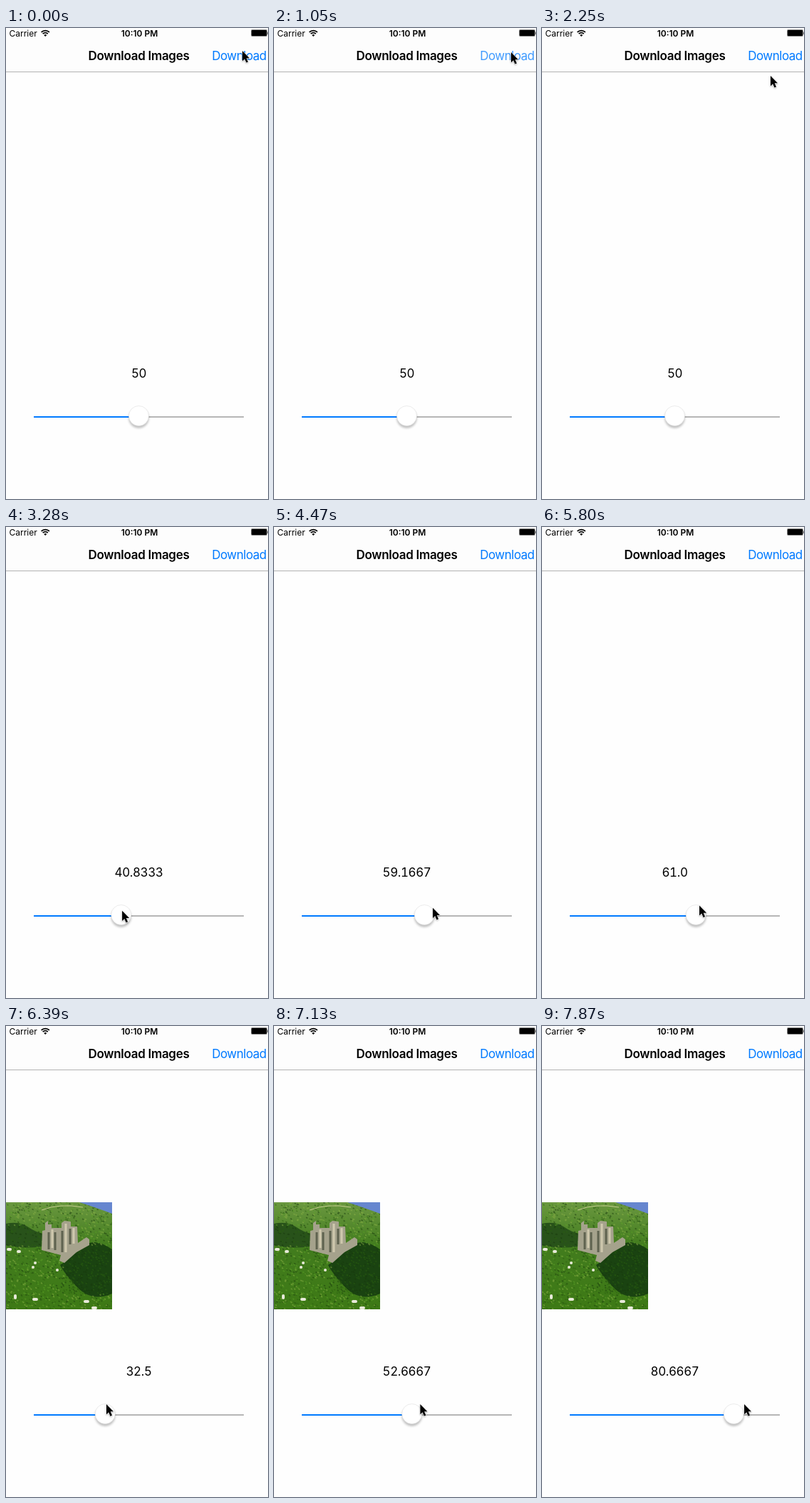
An HTML page for the animation above (8 s loop, 368 px wide and 660 px high).

```html
<!DOCTYPE html>
<html lang="en">
<head>
<meta charset="utf-8">
<title>Download Images</title>
<style>
  html, body { margin: 0; width: 100%; height: 100%; overflow: hidden; background: #fefefe; }
  svg { display: block; }
  text { font: 17px Inter, "Liberation Sans", sans-serif; letter-spacing: -.4px; }
  .title { font-weight: 600; letter-spacing: -.3px; }
  .status { font-size: 12px; letter-spacing: 0; }
  .clock { font-weight: 600; }
  #button { letter-spacing: -.5px; }
  #label { font-variant-numeric: tabular-nums; }
  #knob { filter: drop-shadow(0 3px 1.5px rgba(0, 0, 0, .24)); }
  #cursor { paint-order: stroke; filter: drop-shadow(0 1px 1px rgba(0, 0, 0, .3)); }
</style>
</head>
<body>
<svg width="368" height="660" viewBox="0 0 368 660">
  <defs>
    <linearGradient id="grass" x1="0" y1="0" x2="0" y2="1">
      <stop offset="0" stop-color="#6b9840"/>
      <stop offset=".4" stop-color="#427c1e"/>
      <stop offset="1" stop-color="#3d7915"/>
    </linearGradient>
    <clipPath id="frame"><path d="M0 0h149v150H0z"/></clipPath>
  </defs>

  <path fill="#fdfdfd" d="M0 0h368v61H0z"/>
  <path fill="#b2b2b2" d="M0 61h368v1H0z"/>
  <text class="status" x="4.5" y="11.5">Carrier</text>
  <g fill="none" stroke="#000" stroke-width="1.8">
    <path d="M49.6 5.9a8 8 0 0 1 11.3 0M51.7 8.1a5 5 0 0 1 7.1 0"/>
    <path fill="#000" stroke="none" d="M55.25 12l-2-2.1a2.8 2.8 0 0 1 4 0z"/>
  </g>
  <text class="status clock" x="187.5" y="11.5" text-anchor="middle">10:10 PM</text>
  <rect x="344" y="2" width="23" height="10" rx="2" fill="#888"/>
  <rect x="345" y="3" width="21" height="8" rx="1"/>
  <path fill="#777" d="M367 5.5h1v3.5h-1z"/>
  <text class="title" x="186.5" y="45" text-anchor="middle">Download Images</text>
  <text id="button" x="289.2" y="45" fill="#007aff">Download</text>

  <g id="photo" transform="translate(0 247)" clip-path="url(#frame)">
    <path fill="url(#grass)" d="M0 0h149v150H0z"/>
    <path fill="#28521a" d="M0 30Q18 26 30 34T52 44L50 62Q25 66 0 60z"/>
    <path fill="#1a4311" d="M76 88Q92 76 108 62T149 66V128Q120 140 101 120T76 88z"/>
    <g id="blades" stroke-width="1.6" opacity=".5"/>
    <path fill="#6686cf" d="M103 0h46v16Q128 8 103 0z"/>
    <path fill="none" stroke="#c3cb8e" d="M50 11Q75 1 108 7"/>
    <path fill="#a5a28c" d="M51 40l4-1v-10l4-3v5h5v5h14v-7l4-3 9 1v7h9l1 23 12-8 4 3v8l-18 10-17 15-7-3 2-8-27-7z"/>
    <path stroke="#5f624f" stroke-width="3" d="M60 42v24M69 42v25M79 40v30M90 37v22"/>
    <path stroke="#d0c9ae" stroke-width="3" d="M84 30v40M95 36v22M65 38v26"/>
    <path fill="none" stroke="#e8ead9" stroke-width="4" stroke-linecap="round"
      d="M3 66h3M17 69h2M41 85h0M38 91h0M72 95h0M13 131v3M39 136h4M111 139h4M122 148h4"/>
  </g>

  <text id="label" x="186.5" y="489.5" text-anchor="middle">50</text>
  <path fill="#b6b6b6" d="M39 544h295v2H39z"/>
  <rect id="fill" x="39" y="544" height="2" fill="#007aff"/>
  <circle id="knob" cy="543.5" r="14" fill="#fff" stroke="#ddd" stroke-width=".6"/>
  <path id="cursor" stroke="#fff" d="M0 0V14.2L3.2 11.2 5.5 16.6 8 15.5 5.7 10.3H10z"/>
</svg>
<script>
  const LOOP = 8000, LAST_STEP = 53, PRESS = 5, GRAB = 20, PHOTO_SHOWN = 43;
  const [button, photo, blades, label, fill, knob, cursor] =
    ['button', 'photo', 'blades', 'label', 'fill', 'knob', 'cursor'].map(id => document.getElementById(id));

  // Smooth curve through [step, value] points; flat at turning points and ends.
  function curve(points) {
    const slope = (a, b) => (b[1] - a[1]) / (b[0] - a[0]);
    const tangents = points.map((p, i) => {
      const before = points[i - 1], after = points[i + 1];
      if (!before || !after || slope(before, p) * slope(p, after) <= 0) return 0;
      return slope(before, after);
    });
    return step => {
      if (step >= points.at(-1)[0]) return points.at(-1)[1];
      const i = Math.max(1, points.findIndex(p => p[0] > step));
      const [x0, y0] = points[i - 1], [x1, y1] = points[i];
      const w = x1 - x0, u = (step - x0) / w, v = 1 - u;
      return v * v * ((1 + 2 * u) * y0 + u * w * tangents[i - 1])
           + u * u * ((1 + 2 * v) * y1 - v * w * tangents[i]);
    };
  }

  const dragValue = curve([[GRAB, 50], [22, 40.8333], [24, 33.3333], [25, 33.3333], [30, 59.1667],
    [36, 84.5], [39, 61], [43, 32.5], [44, 32.5], [LAST_STEP, 80.6667]]);
  const approachX = curve([[0, 332], [1, 333], [14, 333], [15, 321], [GRAB, 193]]);
  const pointerY = curve([[0, 32], [1, 34], [14, 34], [15, 67], [GRAB, 538], [36, 531], [LAST_STEP, 530]]);
  // While dragging, the pointer runs slightly ahead of the knob.
  const pointerX = step => step < GRAB ? approachX(step) : 141 + 2.97 * (dragValue(step + .2) - 32.5);

  // The screen refreshes in discrete steps, slightly faster once the pointer moves.
  const stepAt = t => Math.min(LAST_STEP, Math.floor(t < 2250 ? t / 150 : 15 + (t - 2245) / 147.85));

  function growGrass() {
    let seed = 7;
    const random = () => (seed = seed * 16807 % 2147483647) / 2147483647;
    const tones = ['#17380c', '#2b6010', '#5fa528', '#8fb548'];
    const paths = tones.map(() => '');
    for (let i = 0; i < 1300; i++) {
      const x = random() * 149, y = random() * 150;
      const inTrees = x > 82 && y > 62 && y < 128 || x < 50 && y > 32 && y < 60;
      const tone = Math.floor(random() * (inTrees ? 2 : 4));
      paths[tone] += `M${x.toFixed(1)} ${y.toFixed(1)}l2 1.2`;
    }
    blades.innerHTML = paths.map((d, i) => `<path stroke="${tones[i]}" d="${d}"/>`).join('');
  }

  function draw(now) {
    const step = stepAt(now % LOOP);
    const value = step < GRAB ? 50 : Math.round(dragValue(step) * 6) / 6;
    const knobX = 186.5 + 2.7 * (value - 50);
    label.textContent = step <= GRAB ? '50' : value.toFixed(4).replace(/(\.\d+?)0+$/, '$1');
    fill.setAttribute('width', knobX - 39);
    knob.setAttribute('cx', knobX);
    cursor.setAttribute('transform', `translate(${pointerX(step)} ${pointerY(step)})`);
    button.setAttribute('opacity', step < PRESS ? 1 : Math.min(1, .2 + .27 * (step - PRESS)));
    photo.setAttribute('visibility', step < PHOTO_SHOWN ? 'hidden' : 'visible');
    requestAnimationFrame(() => draw(performance.now() - start));
  }

  growGrass();
  const start = performance.now();
  draw(0);
</script>
</body>
</html>
```
